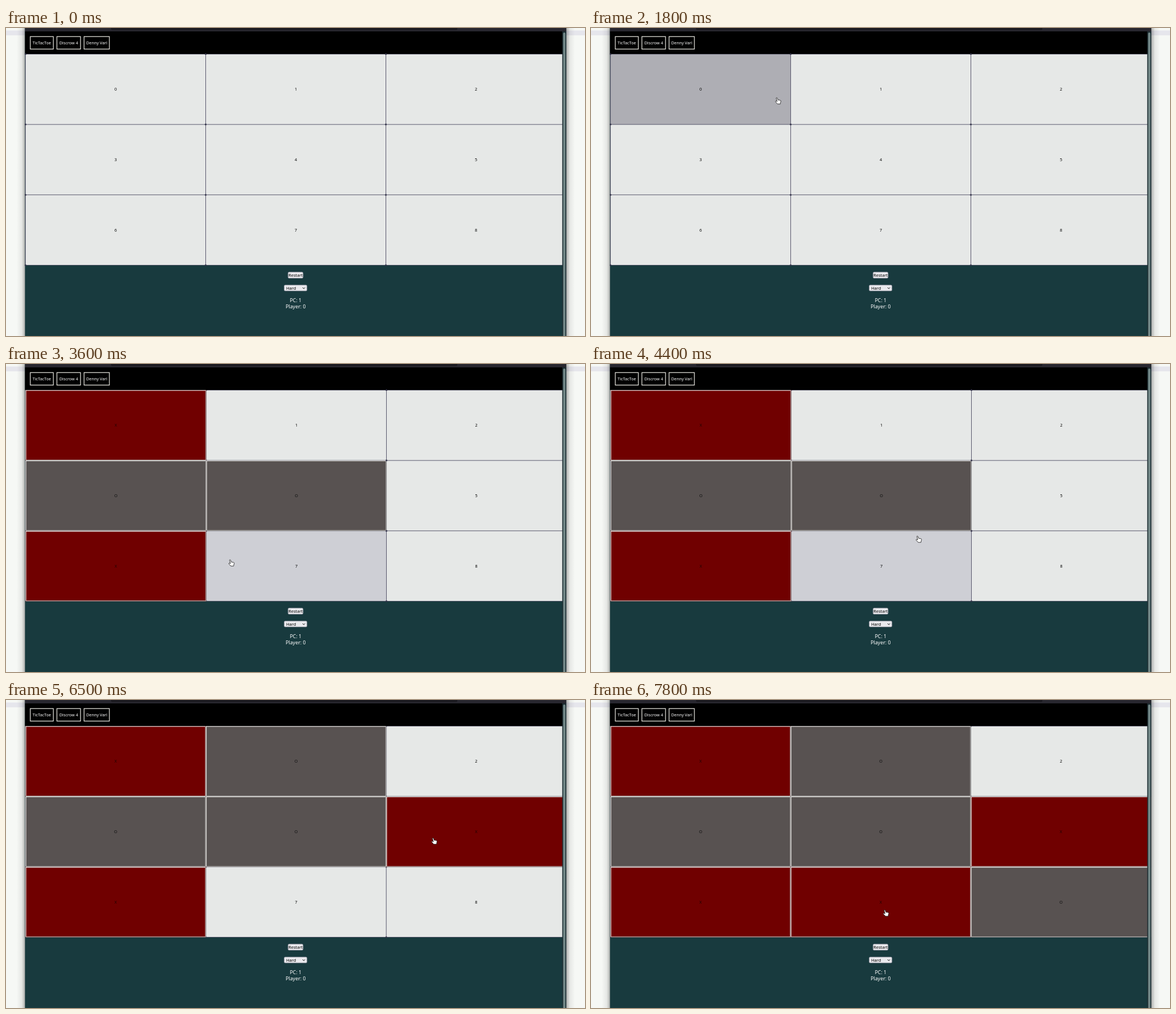
Recreate the animation shown at these times as an HTML page. Size 1025x546 px, loop 8000 ms.

```html
<!DOCTYPE html>
<html lang="en">
<head>
<meta charset="utf-8">
<title>TicTacToe</title>
<style>
html, body { margin: 0; width: 100%; height: 100%; overflow: hidden; background: #f6f8f5; }
svg { display: block; width: 100vw; height: 100vh; }
text { font-family: "Noto Sans", "Open Sans", sans-serif; font-size: 7.3px; }
.mid { text-anchor: middle; }
.form { font-size: 7.5px; }
.score { font-size: 8.9px; fill: #fff; }
</style>
</head>
<body>
<svg viewBox="0 0 1025 546" preserveAspectRatio="none">
  <defs>
    <linearGradient id="shade">
      <stop offset="0" stop-color="#000" stop-opacity="0"/>
      <stop offset=".6" stop-color="#000" stop-opacity=".07"/>
      <stop offset="1" stop-color="#000" stop-opacity=".3"/>
    </linearGradient>
  </defs>
  <rect width="1025" height="546" fill="#f6f8f5"/>
  <rect y="4.5" width="1025" height="8.5" fill="#e6e6ec"/>
  <rect x="19" width="15" height="546" fill="url(#shade)"/>
  <rect x="-1007" width="15" height="546" fill="url(#shade)" transform="scale(-1 1)"/>
  <rect x="33.6" width="958.2" height="546" fill="#183a3e"/>
  <rect x="33.6" width="958.2" height="6" fill="#28272f"/>
  <rect x="186" y="-6" width="613" height="9.5" rx="2" fill="#1a191f"/>
  <rect x="33.6" y="6" width="951.4" height="40" fill="#000"/>
  <g id="nav"></g>
  <rect x="34" y="46" width="951" height="374.8" fill="#57566b"/>
  <g id="board"></g>
  <rect x="984.7" y="6" width="7.1" height="540" fill="#1c2c31"/>
  <rect x="986.3" y="8" width="4" height="545" rx="2" fill="#728888"/>
  <g fill="#e9e9ed" stroke="#8f8f9d" stroke-width=".7">
    <rect x="499.3" y="432.7" width="26.6" height="10.8" rx="1.8"/>
    <rect x="492.4" y="455.7" width="40.4" height="10.4" rx="1.8"/>
  </g>
  <text x="512.6" y="440.8" class="mid form">Restart</text>
  <text x="496" y="463.6" class="form">Hard</text>
  <path d="M525 460l2.2 2.2 2.2-2.2" fill="none" stroke="#111"/>
  <text x="512.8" y="486.2" class="mid score">PC: 1</text>
  <text x="512.8" y="497" class="mid score">Player: 0</text>
  <path id="arrow" d="M-3.5-5V4.2L-1.4 2.4 0 5.4 1.5 4.7.2 1.9H3.4Z" fill="#111" stroke="#fff" stroke-width=".7"/>
  <path id="hand" d="M-3.2-5Q-2.2-6.2-1.2-4.8L0-1.4 3.6-1Q5.3-.7 5.1 1.2L4.4 3.6 4.1 5.7H-.8L-4.4 1.7Q-4.6.1-3.1.4L-1.5 1.3Z"
    fill="#fff" stroke="#111" stroke-width=".8" stroke-linejoin="round"/>
</svg>
<script>
const LOOP = 8000, STEP = 100;
const LEFT = 34.5, TOP = 46.2, COL = 319, ROW = 124.8, BOTTOM = TOP + 3 * ROW;

// press time, play time, player's cell, computer's cell
const TURNS = [[1700, 1900, 0, 4], [2300, 2500, 6, 3], [6500, 6500, 5, 1], [6900, 7100, 7, 8]];

// pointer moves: start, end, then where it comes to rest
const APPEAR = [400, 400, 359, 480];
const MOVES = [
  [500, 1000, 378, 128], [1100, 1400, 331, 129], [1900, 2300, 263, 384],
  [3000, 4400, 580, 310.5], [4400, 5000, 700, 70], [5100, 5600, 738.5, 142.5],
  [5600, 5900, 758, 250], [6600, 6700, 730, 325], [6800, 7000, 495, 388], [7400, 7800, 522, 377.5]
];

const $ = id => document.getElementById(id);
const show = (el, on) => set(el, { visibility: on ? "visible" : "hidden" });

function set(el, attrs) {
  for (const k in attrs) el.setAttribute(k, attrs[k]);
}
function add(parent, tag, attrs = {}) {
  const el = document.createElementNS("http://www.w3.org/2000/svg", tag);
  set(el, attrs);
  return parent.appendChild(el);
}

let navX = 43;
for (const [name, w] of [["TicTacToe", 40.8], ["Discrow 4", 41.8], ["Denny Varl", 44.8]]) {
  add($("nav"), "rect", { x: navX, y: 15.2, width: w, height: 22.2, stroke: "#f1efe8", "stroke-width": 1.2 });
  add($("nav"), "text", { x: navX + w / 2, y: 29.1, fill: "#fff", class: "mid" }).textContent = name;
  navX += w + 6.3;
}

const edge = stroke => add($("board"), "path", { fill: "none", stroke, "stroke-width": 1.3 });
const cells = Array.from({ length: 9 }, () => ({
  box: add($("board"), "rect"),
  light: edge("#dddcd9"),
  dark: edge("#b4b2b0"),
  label: add($("board"), "text", { class: "mid" })
}));
const dots = Array.from({ length: 12 }, () => add($("board"), "circle", { r: 1.4, fill: "#34344a" }));

function pointerAt(t) {
  if (t < APPEAR[0]) return null;
  let [, , x, y] = APPEAR;
  for (const [start, end, toX, toY] of MOVES) {
    const k = Math.min(1, Math.max(0, (t - start) / (end - start)));
    x += (toX - x) * k;
    y += (toY - y) * k;
  }
  return { x, y };
}

// A column widens with its first two marks, at the cost of the others.
function columnEdges(marks) {
  const extra = [0, 1, 2].map(c => Math.min(2, [0, 3, 6].filter(i => marks[i + c]).length));
  const mean = (extra[0] + extra[1] + extra[2]) / 3;
  const edges = [LEFT];
  extra.forEach((e, c) => edges.push(edges[c] + COL + e - mean));
  return edges;
}

function cellFill(mark, hover, pressed) {
  if (mark) return mark === "X" ? "#700000" : "#585251";
  if (hover) return pressed ? "#aeaeb4" : "#cecfd5";
  return "#e6e8e7";
}

function drawCell(i, cols, mark, pointer, pressed) {
  const { box, light, dark, label } = cells[i];
  const c = i % 3, l = cols[c], r = cols[c + 1];
  const top = TOP + Math.floor(i / 3) * ROW, bottom = top + ROW;
  const hover = pointer && pointer.x - 2 >= l && pointer.x - 2 < r && pointer.y - 5 >= top && pointer.y - 5 < bottom;
  const gap = mark ? 0 : 0.5, inset = 0.7;
  set(box, {
    x: l + gap, y: top + gap, width: r - l - 2 * gap, height: ROW - 2 * gap,
    rx: mark ? 0 : 1.6, fill: cellFill(mark, hover, pressed)
  });
  set(light, { d: `M${l + inset} ${bottom - inset}V${top + inset}H${r - inset}` });
  set(dark, { d: `M${l + inset} ${bottom - inset}H${r - inset}V${top + inset}` });
  show(light, mark);
  show(dark, mark);
  label.textContent = mark || i;
  set(label, { x: (l + r) / 2, y: top + ROW / 2 + 2.6, fill: mark === "X" ? "#1c0303" : mark ? "#101010" : "#000" });
}

function drawDot(i, cols, marks) {
  const c = i % 3, r = Math.floor(i / 3);
  const near = marks.filter((_, j) => [0, 1].includes(c - j % 3) && [0, 1].includes(r - Math.floor(j / 3)));
  set(dots[i], { cx: cols[c], cy: TOP + r * ROW });
  show(dots[i], near.length < (c && r % 3 ? 2 : 1));
}

function render(time) {
  const t = Math.floor(time % LOOP / STEP) * STEP;
  const marks = [];
  for (const [, play, x, o] of TURNS) if (t >= play) {
    marks[x] = "X";
    marks[o] = "O";
  }
  const pressed = TURNS.some(([press, play]) => t >= press && t < play);
  const cols = columnEdges(marks);
  const p = pointerAt(t);
  cells.forEach((_, i) => drawCell(i, cols, marks[i], p, pressed));
  dots.forEach((_, i) => drawDot(i, cols, marks));

  const onBoard = p && p.y - 5 < BOTTOM;
  show($("hand"), onBoard);
  show($("arrow"), p && !onBoard);
  if (p) set(onBoard ? $("hand") : $("arrow"), { transform: `translate(${p.x} ${p.y})` });
}

const start = performance.now();
function tick() {
  render(performance.now() - start);
  requestAnimationFrame(tick);
}
tick();
</script>
</body>
</html>
```
